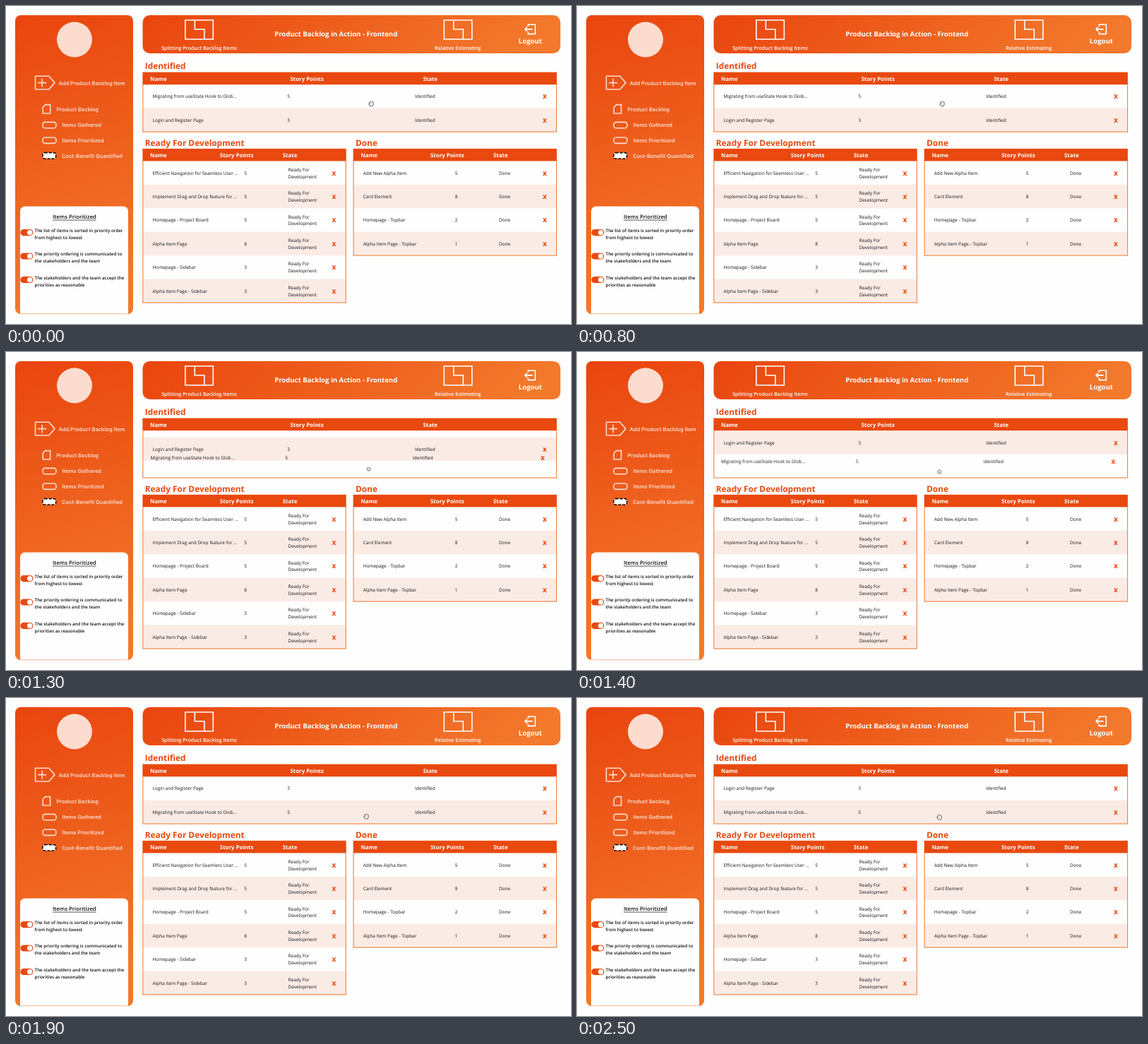
Animation, 800 px wide and 450 px high, one loop 2.6 s. Source, as an HTML page:

```html
<!DOCTYPE html>
<html lang="en">
<head>
<meta charset="utf-8">
<title>Product Backlog in Action</title>
<style>
  html, body { margin: 0; width: 100%; height: 100%; overflow: hidden; background: #fefefe; }
  svg { display: block; width: 800px; height: 450px; }
  text { font-family: "Open Sans", "Noto Sans", sans-serif; text-rendering: geometricPrecision; }
  .side { font: 600 7.5px Inter, "Liberation Sans", sans-serif; fill: #fcdccf; }
  .icon { fill: none; stroke: #fcdccf; stroke-width: 1.6; stroke-linejoin: round; }
  .title { font-size: 9.57px; font-weight: 700; fill: #fff; }
  .link { font-size: 7.1px; font-weight: 600; fill: #fff; }
  .check { font-size: 6.26px; font-weight: 600; fill: #111; }
  .heading { font-size: 11.85px; font-weight: 700; fill: #e9480f; }
  .col { font-size: 7.9px; font-weight: 700; fill: #fff; }
  .cell { font-size: 6.48px; fill: #161616; }
  .del { font-size: 8px; font-weight: 800; fill: #e9480f; }
  .mid { text-anchor: middle; }
  .tint { fill: #fbebe5; }
  .clear { fill: transparent; }

  #drag, #shift, #drag rect, #shift rect, #pointer, #open, #closed, #arrow {
    animation: 2600ms step-end infinite;
  }
  #drag { animation-name: drag; }
  #shift { animation-name: shift; }
  #drag rect { animation-name: tintOn; }
  #shift rect { animation-name: tintOff; }
  #pointer { animation-name: pointer; }
  #open { animation-name: open; }
  #closed { animation-name: closed; }
  #arrow { animation-name: arrow; }

  @keyframes drag {
    0% { transform: translate(0, 0); }
    38.46% { transform: translate(-.5px, 3px); }
    42.3% { transform: translate(-1.5px, 9px); }
    46.15% { transform: translate(-2.6px, 15.8px); }
    49.99% { transform: translate(-3px, 22px); }
    53.84% { transform: translate(-3.5px, 27.2px); }
    57.69% { transform: translate(-2px, 31px); }
    61.53%, 100% { transform: translate(0, 33.4px); }
  }
  @keyframes shift {
    0% { transform: translateY(0); }
    49.99% { transform: translateY(-24px); }
    53.84% { transform: translateY(-33px); }
    57.69%, 100% { transform: translateY(-33.4px); }
  }
  @keyframes tintOn { 0% { fill: transparent; } 73.07%, 100% { fill: #fbebe5; } }
  @keyframes tintOff { 0% { fill: #fbebe5; } 73.07%, 100% { fill: transparent; } }
  @keyframes pointer {
    0% { transform: translate(517px, 138.3px); }
    38.46% { transform: translate(516.5px, 146px); }
    42.3% { transform: translate(515.5px, 153px); }
    46.15% { transform: translate(514.2px, 160.5px); }
    49.99% { transform: translate(513.6px, 165.5px); }
    53.84% { transform: translate(513.2px, 169.3px); }
    57.69% { transform: translate(512px, 169.3px); }
    61.53% { transform: translate(510px, 168px); }
    65.38% { transform: translate(508px, 167px); }
    69.23% { transform: translate(508px, 166.5px); }
    73.07% { transform: translate(510px, 167.5px); }
    76.92%, 100% { transform: translate(513px, 168.6px); }
  }
  @keyframes open {
    0% { opacity: 1; }
    34.61% { opacity: 0; }
    73.07%, 100% { opacity: 1; }
  }
  @keyframes closed {
    0% { opacity: 0; }
    34.61% { opacity: 1; }
    61.53%, 100% { opacity: 0; }
  }
  @keyframes arrow {
    0% { opacity: 0; }
    61.53% { opacity: 1; }
    73.07%, 100% { opacity: 0; }
  }
</style>
</head>
<body>
<svg viewBox="0 0 800 450">
  <defs>
    <linearGradient id="down" x1="0" y1="0" x2=".12" y2="1">
      <stop offset="0" stop-color="#e9450e"/><stop offset="1" stop-color="#f3792c"/>
    </linearGradient>
    <linearGradient id="across" x1="0" y1="0" x2="1" y2=".1">
      <stop offset="0" stop-color="#e9450e"/><stop offset="1" stop-color="#f3792c"/>
    </linearGradient>
    <g id="split" class="icon" style="stroke:#fff;stroke-linejoin:miter">
      <path d="M0 0H39.5V27H0ZM13.5 0V13H27V27"/>
    </g>
    <g id="toggle">
      <rect width="18" height="9.2" rx="4.6" fill="#e9480f"/>
      <circle cx="13.2" cy="4.6" r="3.6" fill="#fff"/>
    </g>
  </defs>

  <rect x="13" y="13" width="167" height="423" rx="8" fill="url(#down)"/>
  <circle cx="97" cy="47.5" r="25" fill="#fcdccf"/>
  <g class="icon">
    <path d="M41.5 99.3H60.8L69 108.6L60.8 118H41.5ZM45.2 108.6H57M51.1 102.7V114.5"/>
    <path d="M55.8 139.6H62.6V152H52.2V143.2Z"/>
    <rect x="52" y="164.4" width="19" height="8.4" rx="3.4"/>
    <rect x="52" y="186" width="19" height="8.4" rx="3.4"/>
    <rect x="52" y="207.6" width="18.6" height="8.4" rx="2.6" fill="#fff" stroke="#111" stroke-dasharray="4.2 1.8"/>
  </g>
  <g class="side">
    <text class="side" x="74.5" y="111.7">Add Product Backlog Item</text>
    <text class="side" x="71.5" y="148.5">Product Backlog</text>
    <text class="side" x="79.5" y="171.3">Items Gathered</text>
    <text class="side" x="79.5" y="192.9">Items Prioritized</text>
    <text class="side" x="79" y="214.6">Cost-Benefit Quantified</text>
  </g>

  <path d="M20 435.4V291q0-7.5 7.5-7.5H165.5q7.5 0 7.5 7.5V435.4Z" fill="#fefefe"/>
  <text class="check mid" x="96.8" y="301.4" style="font-size:7.75px">Items Prioritized</text>
  <path d="M66 303H127.6" stroke="#111" stroke-width=".7"/>
  <g id="checks"></g>

  <rect x="193.5" y="13" width="591.5" height="54" rx="10" fill="url(#across)"/>
  <use href="#split" x="253.8" y="20"/>
  <use href="#split" x="620.3" y="20"/>
  <text class="link mid" x="273.4" y="61.8">Splitting Product Backlog Items</text>
  <text class="title mid" x="467.2" y="43.2">Product Backlog in Action - Frontend</text>
  <text class="link mid" x="639.8" y="61.8">Relative Estimating</text>
  <path d="M739.3 29V26.2H749.3V39.6H739.3V36.8M745.5 32.9H735M738 29.8L734.8 32.9L738 36"
    fill="none" stroke="#fff" stroke-width="1.6" stroke-linejoin="round"/>
  <text class="title mid" x="742.4" y="53">Logout</text>

  <g id="tables"></g>

  <g id="pointer" fill="#fff" stroke="#222" stroke-width=".75" stroke-linejoin="round">
    <path id="open" d="M-1.5 3.4L-3.3 .6Q-3.6-.5-2.5-.3L-1.8 .4L-2.2-2.2Q-1.7-3.2-1.1-2.3L-.8-2.9Q0-3.9 .6-2.8Q1.5-3.6 1.9-2.3Q2.8-2.6 3-1.6L3 1.2L2.1 3.4Z"/>
    <path id="closed" d="M-1.5 2.3L-2.5 .5Q-2.7-.4-2-.5L-1.9-1.6Q-1.2-2.4-.6-1.7Q.1-2.5 .7-1.7Q1.5-2.2 1.9-1.3Q2.6-1.2 2.5-.4L1.8 2.3Z"/>
    <path id="arrow" d="M-1.2-4V3L.4 1.6L1.5 4L2.5 3.5L1.5 1.2H3.5Z"/>
  </g>
</svg>

<script>
  const rowH = 33.4, headH = 17;
  const text = (cls, x, y, s) => `<text class="${cls}" x="${x}" y="${y}">${s}</text>`;

  function row(t, [name, points, state], i) {
    const top = t.y + headH + i * rowH, mid = top + rowH / 2 + .5;
    const lines = state.split("|");
    const stateText = lines
      .map((s, n) => text("cell", t.cells[1], mid + 2 + (n - (lines.length - 1) / 2) * 9.8, s)).join("");
    const id = t.ids ? ` id="${t.ids[i]}"` : "";
    return `<g${id}><rect class="${i % 2 ? "tint" : "clear"}" x="${t.x + .5}" y="${top}" width="${t.w - 1}" height="${rowH}"/>`
      + text("cell", t.x + 13.7, mid + 2, name)
      + text("cell mid", t.cells[0], mid + 2, points)
      + stateText
      + text("del mid", t.x + t.w - 16.7, mid + 2.9, "X") + "</g>";
  }

  function table(t) {
    // later rows first, so the dragged top row paints above them
    const rows = t.rows.map((r, i) => row(t, r, i)).reverse().join("");
    return text("heading", t.x + 3, t.y - 4.8, t.title)
      + rows
      + `<rect x="${t.x}" y="${t.y}" width="${t.w}" height="${headH + t.rows.length * rowH}" fill="none" stroke="#f08a4a" stroke-width="1.2"/>`
      + `<rect x="${t.x}" y="${t.y - .3}" width="${t.w}" height="${headH + .3}" fill="#e9480f"/>`
      + ["Name", "Story Points", "State"].map((s, i) => text("col", t.cols[i], t.y + 11.8, s)).join("");
  }

  const ready = "Ready For|Development";
  const tables = [
    { title: "Identified", x: 193.8, y: 94.2, w: 585.7, cols: [204, 402.4, 590.4], cells: [400, 579],
      ids: ["drag", "shift"],
      rows: [["Migrating from useState Hook to Glob...", 5, "Identified"],
             ["Login and Register Page", 3, "Identified"]] },
    { title: "Ready For Development", x: 193.8, y: 202.4, w: 287.4, cols: [204, 302.8, 391.7], cells: [339, 399.5],
      rows: [["Efficient Navigation for Seamless User ...", 5, ready],
             ["Implement Drag and Drop feature for ...", 5, ready],
             ["Homepage - Project Board", 5, ready],
             ["Alpha Item Page", 8, ready],
             ["Homepage - Sidebar", 3, ready],
             ["Alpha Item Page - Sidebar", 3, ready]] },
    { title: "Done", x: 492, y: 202.4, w: 287.5, cols: [502.4, 601, 690], cells: [637.5, 698],
      rows: [["Add New Alpha Item", 5, "Done"],
             ["Card Element", 8, "Done"],
             ["Homepage - Topbar", 2, "Done"],
             ["Alpha Item Page - Topbar", 1, "Done"]] }
  ];
  document.getElementById("tables").innerHTML = tables.map(table).join("");

  const checks = [
    ["The list of items is sorted in priority order", "from highest to lowest"],
    ["The priority ordering is communicated to", "the stakeholders and the team"],
    ["The stakeholders and the team accept the", "priorities as reasonable"]
  ];
  document.getElementById("checks").innerHTML = checks.map(([a, b], i) => {
    const y = 320 + i * 33.4;
    return `<use href="#toggle" x="20.4" y="${y - 4}"/>` + text("check", 40.6, y, a) + text("check", 40.6, y + 9.9, b);
  }).join("");
</script>
</body>
</html>
```
